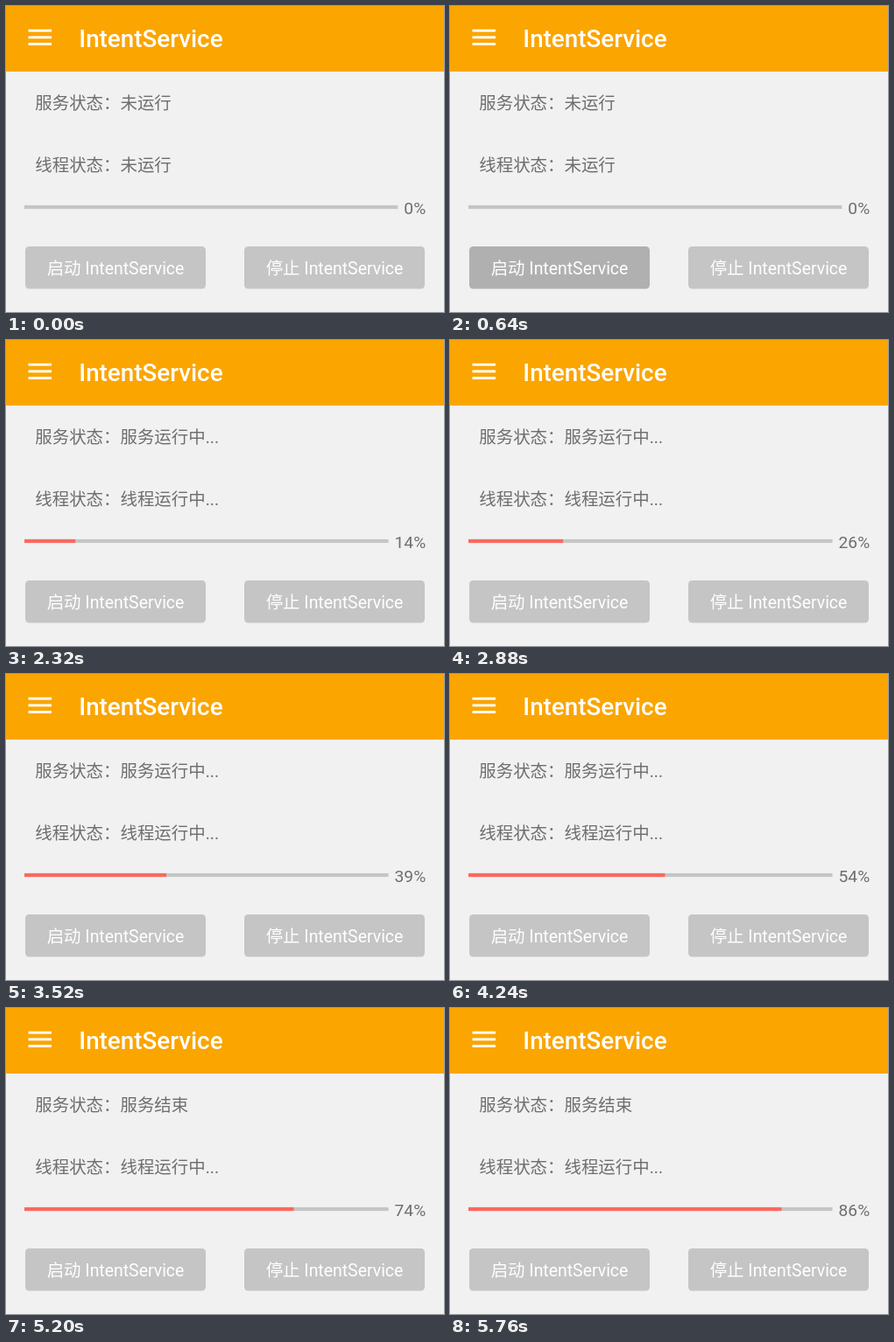
An HTML page with a canvas for the animation above (5.86 s loop, 500 by 350 pixels).

```html
<!DOCTYPE html>
<html lang="zh-CN">
<head>
<meta charset="utf-8">
<title>IntentService</title>
<style>
  html, body { margin: 0; width: 100%; height: 100%; overflow: hidden; background: #f1f1f1; }
  canvas { display: block; }
</style>
</head>
<body>
<canvas id="stage" width="500" height="350"></canvas>
<script>
const ctx = document.getElementById('stage').getContext('2d');

const LOOP = 5860, STEP = 80, LAST = 5760;
const FAMILY = 'Roboto, "Noto Sans CJK SC", "Noto Sans CJK", sans-serif';
const BODY = `400 19.44px ${FAMILY}`;
const SMALL = `400 19.2px ${FAMILY}`;
const TITLE = `500 27.8px ${FAMILY}`;
const GREY = '#c5c5c5', PRESSED = '#b0b0b0', INK = '#6e6e6e';
const BAR_LEFT = 21, LABEL_RIGHT = 479.2, LABEL_GAP = 7;

// Each track lists [start time, value]; the last started entry holds.
const service = [[0, '未运行'], [720, '服务启动'], [1680, '服务运行中...'], [4560, '服务结束']];
const thread = [[0, '未运行'], [720, '线程启动'], [1760, '线程运行中...']];
const startFill = [[0, GREY], [640, PRESSED], [720, GREY]];
const stopFill = [[0, GREY], [4480, PRESSED], [4560, GREY]];

const at = (track, t) => track.filter(([start]) => start <= t).pop()[1];

const percent = t => Math.max(0, Math.floor((t - 1635) / 47.7));

function rect(x, y, w, h, color) {
  ctx.fillStyle = color;
  ctx.fillRect(x, y, w, h);
}

function text(str, x, y, color, align = 'left', font = BODY) {
  ctx.font = font;
  ctx.fillStyle = color;
  ctx.textAlign = align;
  ctx.fillText(str, x, y);
}

function header() {
  rect(0, 0, 500, 75, '#fba500');
  for (let i = 0; i < 3; i++) rect(25.5, 26.7 + 7.7 * i, 26.5, 2.9, '#fff');
  text('IntentService', 83.3, 47, '#fff', 'left', TITLE);
}

function progress(p) {
  const label = p + '%';
  text(label, LABEL_RIGHT, 237.5, INK, 'right', SMALL);
  const width = LABEL_RIGHT - ctx.measureText(label).width - LABEL_GAP - BAR_LEFT;
  rect(BAR_LEFT, 227.9, width, 4.2, GREY);
  rect(BAR_LEFT, 227.9, width * p / 100, 4.2, '#fc685e');
}

function button(x, label, fill) {
  ctx.fillStyle = fill;
  ctx.beginPath();
  ctx.roundRect(x, 275, 206, 48.5, 4.5);
  ctx.fill();
  text(label, x + 103, 307, '#fff', 'center');
}

function draw(t) {
  rect(0, 0, 500, 350, '#f1f1f1');
  header();
  text('服务状态：' + at(service, t), 33.3, 118, INK);
  text('线程状态：' + at(thread, t), 33.3, 189, INK);
  progress(percent(t));
  button(22, '启动 IntentService', at(startFill, t));
  button(272, '停止 IntentService', at(stopFill, t));
}

function tick() {
  const t = performance.now() % LOOP;
  draw(Math.min(LAST, Math.floor(t / STEP) * STEP));
  requestAnimationFrame(tick);
}
tick();
</script>
</body>
</html>
```
